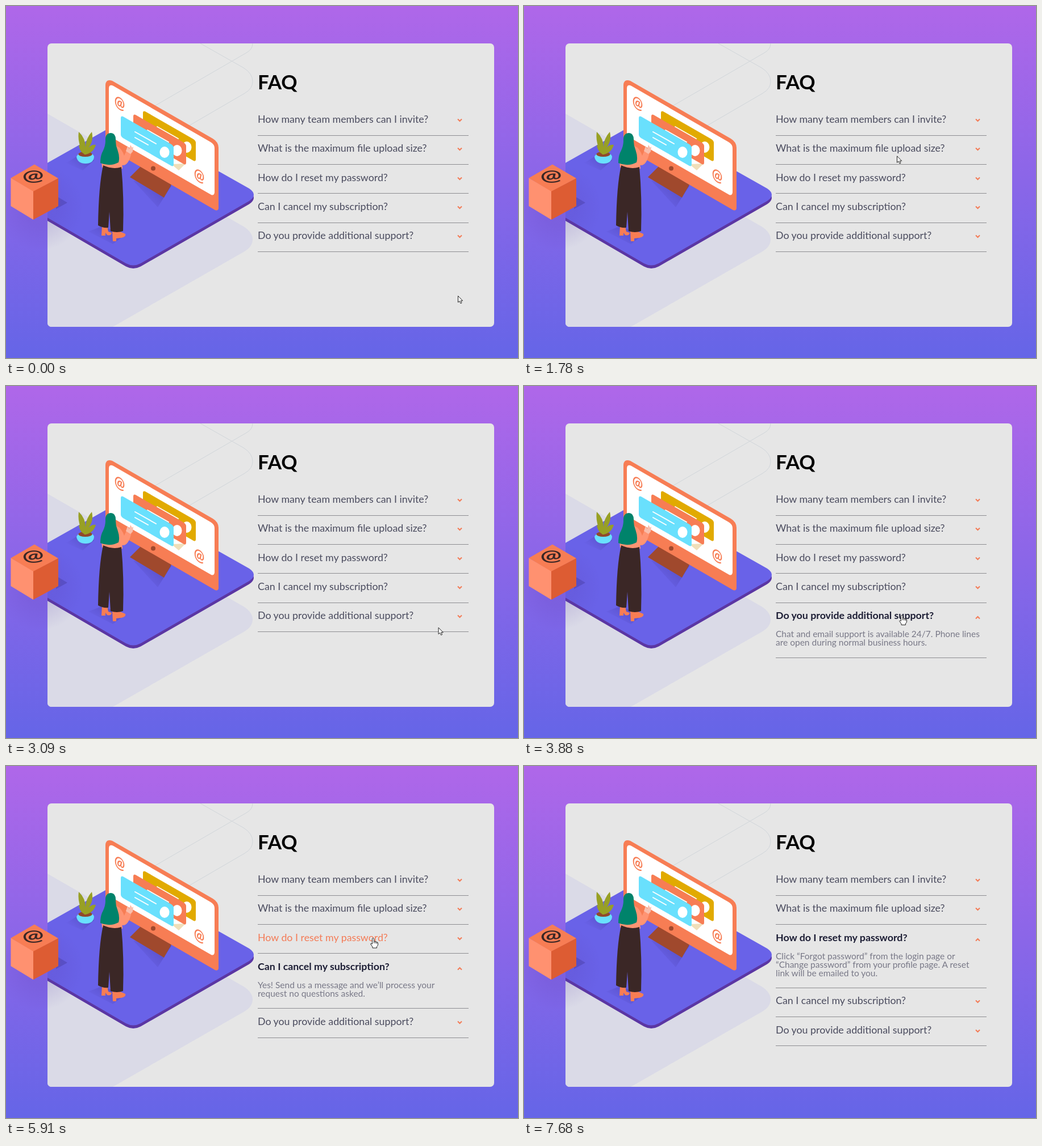
Animation of 901x621 px, one loop 8 s. Source, as an HTML page:

```html
<!DOCTYPE html>
<html lang="en">
<head>
<meta charset="utf-8">
<title>FAQ accordion</title>
<style>
  html, body { margin: 0; width: 100%; height: 100%; overflow: hidden; }
  svg { display: block; width: 100vw; height: 100vh; font-family: Lato, "Open Sans", sans-serif; }
  .title { font-size: 35px; font-weight: 700; }
  .q { font-size: 17.8px; fill: #4a4b5e; }
  .hover .q { fill: #f47b56; }
  .open .q { font-weight: 700; fill: #1d1e35; }
  .a { font-size: 15.5px; fill: #787887; display: none; }
  .open .a { display: inline; }
  .chev { fill: none; stroke: #f47b56; stroke-width: 2; }
  .open .chev { transform: translateY(5px) scaleY(-1); }
  .at { font-size: 28px; font-weight: 700; text-anchor: middle; fill: #f77d54; }
</style>
</head>
<body>
<svg viewBox="0 0 901 621" preserveAspectRatio="none">
  <defs>
    <linearGradient id="sky" x2="0" y2="1">
      <stop stop-color="#af67e9"/><stop offset="1" stop-color="#6565e7"/>
    </linearGradient>
    <radialGradient id="glow">
      <stop offset=".4" stop-color="#5a3fae" stop-opacity=".16"/>
      <stop offset="1" stop-color="#5a3fae" stop-opacity="0"/>
    </radialGradient>
    <linearGradient id="shade" x1="1" y1="0" x2="0" y2=".7">
      <stop stop-color="#3f3494" stop-opacity=".75"/>
      <stop offset="1" stop-color="#5a50cc" stop-opacity="0"/>
    </linearGradient>
    <clipPath id="card"><rect x="73" y="66" width="786" height="500" rx="7"/></clipPath>
    <path id="floor" d="M60 284 L200 205 L240 214 L375 292 L428 322 Q444 333 428 344 L237 454 Q224 461 211 454 L60 366Z"/>
    <g id="tile">
      <path d="M0 4 Q0 -1 4 1 L89 50 Q93 53 93 56 V85 Q93 90 89 88 L4 39 Q0 36 0 33Z"/>
      <ellipse cx="77" cy="64" rx="8.500" ry="10" fill="#fff"/>
      <path stroke="#fff" stroke-width="2" stroke-linecap="round" d="M25 28 L62 49 M25 38 L48 51"/>
    </g>
  </defs>

  <rect width="901" height="621" fill="url(#sky)"/>
  <g clip-path="url(#card)">
    <rect x="73" y="66" width="786" height="500" fill="#e6e6e6"/>
    <path fill="#dadae7" d="M73 190 L418 389 Q434 399 434 412 Q434 425 418 434 L188 566 H73Z"/>
    <path fill="none" stroke="#d0d5d9" d="M342 66 L418 109 Q434 119 434 133 Q434 146 420 154 L300 224 M434 66 Q434 76 424 82 L250 183"/>
    <use href="#floor" y="5.500" fill="#5b36a3"/>
    <use href="#floor" fill="#6962e8"/>
    <path fill="url(#shade)" d="M224 308 L267 355 L291 317Z"/>
    <path fill="url(#shade)" d="M106 277 L130 262 L155 272 L135 290Z"/>
    <path fill="url(#shade)" d="M145 398 L170 388 L208 405 L188 420Z"/>
  </g>

  <!-- monitor -->
  <path fill="#a0492d" d="M218 302 L237 283 L291 315 L278 338Z"/>
  <path fill="#f77d54" d="M175 139 Q176 128 187 132 L364 234 Q374 240 374 250 V357 Q373 362 368 360 L175 248Z"/>
  <path fill="#fff" d="M181 146 Q181 137 189 141 L360 240 Q367 244 367 251 V329 Q366 335 361 333 L181 229Z"/>
  <circle cx="259" cy="286.500" r="4" fill="#a0492d"/>
  <text class="at" transform="matrix(.78 .42 0 .98 200 173)" y="7">@</text>
  <text class="at" transform="matrix(.78 .42 0 .98 340 301)" y="7">@</text>
  <path fill="#f0dfba" d="M291 279 L304 290 L316 278Z"/>
  <use href="#tile" x="241" y="185" fill="#e1aa00"/>
  <use href="#tile" x="224" y="191" fill="#f77d54"/>
  <use href="#tile" x="202" y="194" fill="#69e0fd"/>

  <!-- plant -->
  <path fill="#69e0fd" d="M124 266 Q126 259 140 259 Q154 259 155 266 Q154 278 140 278 Q126 278 124 266Z"/>
  <ellipse cx="139.500" cy="261.500" rx="12" ry="4.500" fill="#91492c"/>
  <path fill="#98a024" d="M138 262 Q125 243 128 222 Q141 234 140 253 Q139 235 151 222 Q155 238 145 250 Q151 244 158 245 Q154 259 140 262 Q130 259 128 245 Q138 249 138 262Z"/>

  <!-- woman -->
  <path fill="#f77d54" d="M169 388 H178 L180 398 L186 400 Q185 406 178 404 L175 400 V405 H168Z M187 397 H198 L210 402 Q212 407 203 409 L194 410 V415 H188Z"/>
  <path fill="#ff9473" d="M168 270 L204 276 L205 287 L169 285Z M192 246 Q203 249 208 264 L213 253 L221 258 Q216 281 206 281 Q198 281 193 269Z"/>
  <path fill="#f9beac" d="M211 256 L214 247 L217 252 L219 245 L222 250 L224 248 L223 257 L219 261Z"/>
  <path fill="#3b2726" d="M171 281 Q188 289 203 284 Q208 338 206 397 Q195 401 184 397 L182 363 L180 391 Q170 392 162 387 Q163 317 171 281Z"/>
  <path fill="#00836b" d="M175 238 Q174 224 185 224 Q194 225 193 238 Q193 246 196 253 Q201 267 198 276 Q183 284 166 277 Q166 266 169 259 Q175 248 175 238Z"/>

  <!-- cube -->
  <circle cx="60" cy="355" r="76" fill="url(#glow)"/>
  <path fill="#5147b5" opacity=".65" d="M88 335 L108 347 L88 358Z"/>
  <path fill="#f77d54" d="M50 279.500 L92 304 L48 328 L8.500 303.500Z"/>
  <path fill="#ff9170" d="M8.500 303.500 L48 327 V377 L8.500 353Z"/>
  <path fill="#dd5c33" d="M92 304 V353 L48 377 V327Z"/>
  <text class="at" transform="matrix(1.6 -.15 .2 .95 48 302)" y="7" style="fill:#3b2726">@</text>

  <text class="title" x="443" y="147">FAQ</text>
  <g id="list"></g>
  <circle id="click" r="11.500" fill="#f8ee32" opacity=".75"/>
  <g id="pointer" fill="#fff" stroke="#222" stroke-linejoin="round">
    <path id="arrow" d="M.5 .5 V12 L3 9.500 L5 13.700 L7 12.800 L5.200 9 H8.700Z"/>
    <path id="hand" d="M-1.500 0 Q0 -2 1.500 0 V5 Q3 3.600 4 5.500 Q6 4.500 6.500 6.500 Q8.500 6 8.500 8 V11 Q8 13 6.500 14 V16.500 H-1 V14.500 L-4.500 9.500 Q-4 7.500 -1.500 9.500Z M1.500 5 V8 M4 5.500 V8.500 M6.500 6.500 V9"/>
  </g>
</svg>
<script>
const LOOP = 8000, EXIT = 7680;
const faq = [
  ["How many team members can I invite?", []],
  ["What is the maximum file upload size?", []],
  ["How do I reset my password?", [
    "Click “Forgot password” from the login page or",
    "“Change password” from your profile page. A reset",
    "link will be emailed to you."]],
  ["Can I cancel my subscription?", [
    "Yes! Send us a message and we’ll process your",
    "request no questions asked."]],
  ["Do you provide additional support?", [
    "Chat and email support is available 24/7. Phone lines",
    "are open during normal business hours."]]
];
// pointer moves: departure, arrival, x, y
const moves = [
  [60, 1470, 656, 201], [1600, 2390, 656, 357], [2450, 3230, 764, 428],
  [3260, 3600, 665, 405], [4260, 4870, 635.5, 351.5], [5480, 5910, 646, 304.5],
  [6400, 6600, 698, 379], [6640, 7000, 740, 501], [7080, EXIT, 857, 297]
];
// clicks: press, release, row
const clicks = [[3620, 3770, 4], [4090, 4260, 4], [5190, 5340, 3], [6140, 6220, 2]];

const $ = id => document.getElementById(id);
const show = (el, on) => el.style.display = on ? "" : "none";
const place = (el, x, y) => el.setAttribute("transform", `translate(${x} ${y})`);

$("list").innerHTML = faq.map(([q, lines]) => `<g>
  <text class="q" x="443" y="6">${q}</text>
  ${lines.map((s, i) => `<text class="a" x="443" y="${38 + 15 * i}">${s}</text>`).join("")}
  <path class="chev" d="M795 -.5 L798.5 3 L802 -.5"/>
  <rect x="443" width="371" height="1" fill="#8d8d91"/>
</g>`).join("");
const rows = [...$("list").children];

function pointerAt(t) {
  let x = 795, y = 511;
  for (const [from, to, nx, ny] of moves) {
    const k = Math.min(1, Math.max(0, (t - from) / (to - from)));
    const ease = k * (2 - k);
    x += (nx - x) * ease;
    y += (ny - y) * ease;
  }
  return [x, y];
}

function draw(t) {
  const [x, y] = pointerAt(t);
  const active = clicks.reduce((row, [, up, hit]) => t < up ? row : row === hit ? -1 : hit, -1);
  let shift = 0, over = false;
  rows.forEach((row, i) => {
    const mid = 200 + 51.35 * i + shift, top = Math.round(mid);
    const open = i === active, extra = open ? 16 + 14.8 * faq[i][1].length : 0;
    const hover = Math.abs(y - mid) < 12 && x > 443 && x < 814;
    place(row, 0, top);
    row.setAttribute("class", open ? "open" : hover ? "hover" : "");
    row.lastElementChild.setAttribute("y", Math.round(mid + 27.6 + extra) - top);
    shift += extra;
    over ||= hover;
  });
  place($("pointer"), x, y);
  place($("click"), x, y);
  show($("pointer"), t < EXIT);
  show($("hand"), over);
  show($("arrow"), !over);
  show($("click"), clicks.some(([down, up]) => t >= down && t < up));
}

const start = performance.now();
function frame() {
  draw((performance.now() - start) % LOOP);
  requestAnimationFrame(frame);
}
frame();
</script>
</body>
</html>
```
